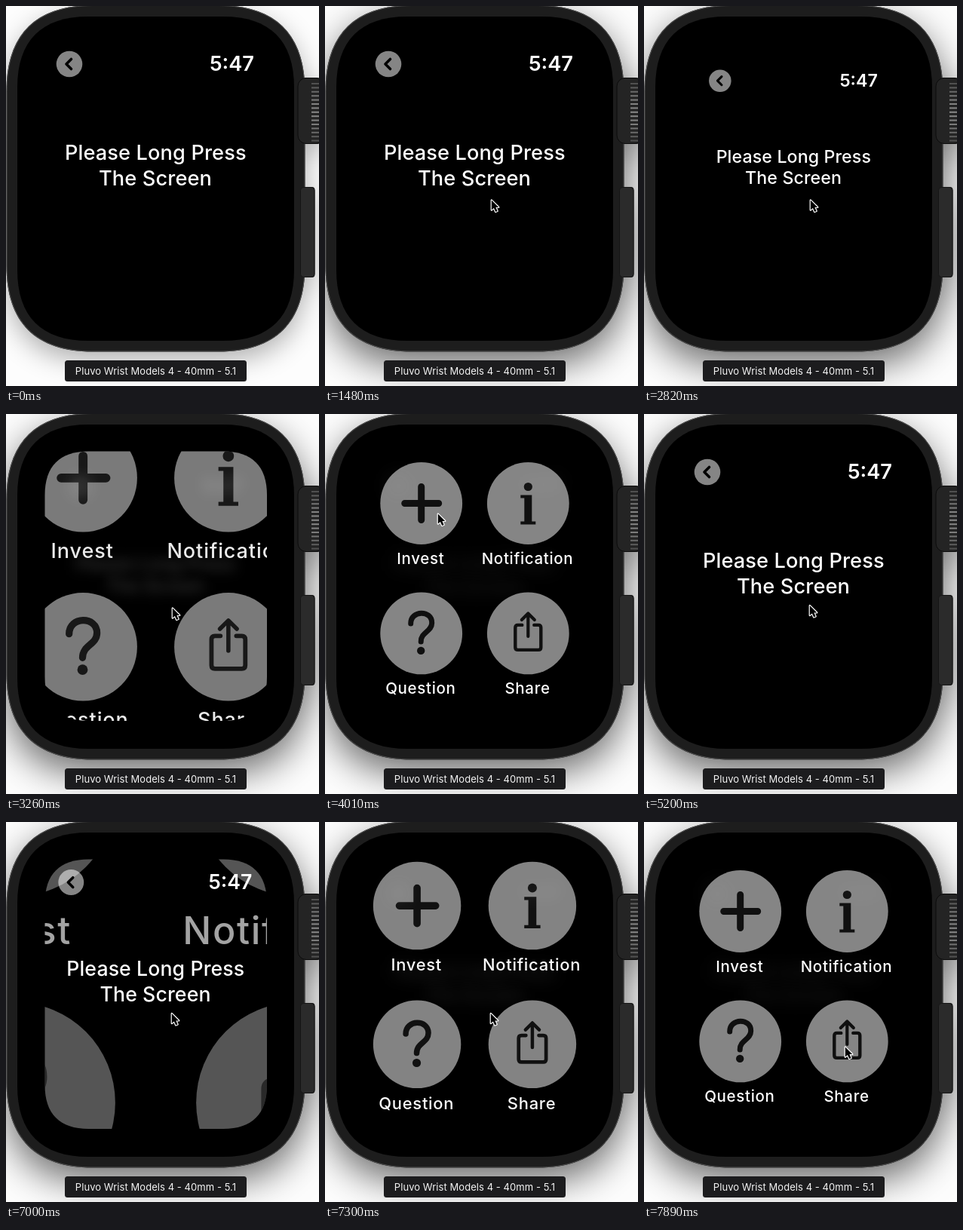
These frames come from a looping animation (415x504 px, 8 s). An HTML page with a canvas:

```html
<!DOCTYPE html>
<html lang="en">
<head>
<meta charset="utf-8">
<title>Long press menu</title>
<style>
html, body { margin: 0; width: 100%; height: 100%; overflow: hidden; background: #fdfdfd; }
canvas { display: block; width: 415px; height: 504px; }
</style>
</head>
<body>
<canvas id="stage"></canvas>
<script>
const W = 415, H = 504, LOOP = 8000;
const FONT = 'Inter, "Open Sans", sans-serif';
const canvas = document.getElementById('stage');
const ctx = canvas.getContext('2d');
const dpr = window.devicePixelRatio || 1;
canvas.width = Math.round(W * dpr);
canvas.height = Math.round(H * dpr);

const clamp = (v, a = 0, b = 1) => Math.min(b, Math.max(a, v));
const mix = (a, b, p) => a + (b - a) * p;
const ease = p => { p = clamp(p); return p * p * (3 - 2 * p); };
// Each burst of motion runs in seven held steps, 0 to 6.
const stepAt = (t, from, to) => clamp(Math.floor((t - from) * 6 / (to - from) + 1e-3), 0, 6);

function fillRound(x, y, w, h, r, fill, edge) {
  ctx.beginPath();
  ctx.roundRect(x, y, w, h, r);
  ctx.fillStyle = fill;
  ctx.fill();
  if (edge) {
    ctx.strokeStyle = edge;
    ctx.lineWidth = 1;
    ctx.stroke();
  }
}

function disc(x, y, r, fill) {
  ctx.beginPath();
  ctx.arc(x, y, r, 0, Math.PI * 2);
  ctx.fillStyle = fill;
  ctx.fill();
}

function text(str, x, y, size, weight, align = 'center', spacing = 0, fill = '#fff') {
  ctx.font = `${weight} ${size}px ${FONT}`;
  ctx.letterSpacing = spacing + 'px';
  ctx.textAlign = align;
  ctx.fillStyle = fill;
  ctx.fillText(str, x, y);
}

function line(d, width, color) {
  ctx.strokeStyle = color;
  ctx.lineWidth = width;
  ctx.lineCap = ctx.lineJoin = 'round';
  ctx.stroke(new Path2D(d));
}

// Rounded box whose corners ease in like a squircle.
function squircle(l, t, r, b, c) {
  const k = c * 0.34;
  ctx.beginPath();
  ctx.moveTo(l + c, t);
  ctx.lineTo(r - c, t);
  ctx.bezierCurveTo(r - k, t, r, t + k, r, t + c);
  ctx.lineTo(r, b - c);
  ctx.bezierCurveTo(r, b - k, r - k, b, r - c, b);
  ctx.lineTo(l + c, b);
  ctx.bezierCurveTo(l + k, b, l, b - k, l, b - c);
  ctx.lineTo(l, t + c);
  ctx.bezierCurveTo(l, t + k, l + k, t, l + c, t);
  ctx.closePath();
}

function drawDevice(focus) {
  ctx.fillStyle = '#fdfdfd';
  ctx.fillRect(0, 0, W, H);

  // Case, crown and button cast one shadow together.
  ctx.save();
  ctx.shadowColor = `rgba(0,0,0,${mix(0.3, 0.58, focus)})`;
  ctx.shadowBlur = mix(34, 50, focus) * dpr;
  ctx.shadowOffsetY = mix(12, 18, focus) * dpr;
  squircle(0.5, -1, 396.5, 458.5, 114);
  ctx.roundRect(386.5, 95, 36, 88, 11);
  ctx.roundRect(390, 240, 19.5, 120, 4);
  ctx.fillStyle = '#1d1d1d';
  ctx.fill();
  ctx.restore();
  squircle(1, -0.5, 396, 458, 114);
  ctx.strokeStyle = '#505050';
  ctx.lineWidth = 1;
  ctx.stroke();
  squircle(15, 14, 382, 444, 94);
  ctx.fillStyle = '#000';
  ctx.fill();

  fillRound(387, 95.5, 35, 87, 11, '#242424', '#0b0b0b');
  for (let y = 102; y < 178; y += 5.4) {
    const glow = Math.round(mix(70, 135, Math.sin((y - 98) / 84 * Math.PI)));
    ctx.fillStyle = `rgb(${glow},${glow},${glow})`;
    ctx.fillRect(405, y, 10, 2);
  }
  fillRound(390.5, 240.5, 18.5, 119, 4, '#2b2b2b', '#151515');

  fillRound(78, 470, 241, 28, 3.5, '#1c1c1e');
  text('Pluvo Wrist Models 4 - 40mm - 5.1', 198.5, 489, 13, 400, 'center', 0.06, '#f4f4f4');
}

function drawHome({ scale, alpha, blur }) {
  if (alpha <= 0) return;
  ctx.save();
  ctx.globalAlpha = alpha;
  if (blur) ctx.filter = `blur(${blur * dpr}px)`;
  ctx.translate(198.5, 228);
  ctx.scale(scale, scale);
  ctx.translate(-198.5, -228);
  disc(84, 77, 17.3, 'rgba(255,255,255,.52)');
  line('M86.5 70.5L80 77L86.5 83.5', 3.6, '#000');
  text('5:47', 329, 86, 27.2, 560, 'right');
  text('Please Long Press', 198.3, 204, 27.2, 450, 'center', 0.12);
  text('The Screen', 198, 237.7, 27.2, 450, 'center', 0.12);
  ctx.restore();
}

const INK = '#101010';
const items = [
  { label: 'Invest', col: -1, row: -1, icon() {
    line('M-22 0H23M0 -22V22', 9, INK);
  } },
  { label: 'Notification', col: 1, row: -1, icon() {
    disc(0, -22, 5.6, INK);
    ctx.fill(new Path2D('M-10 -11H5V24H10V28H-10V24H-5V-7H-10Z'));
  } },
  { label: 'Question', col: -1, row: 1, icon() {
    line('M-14 -13C-14 -31 14 -31 14 -14C14 -2 -.5 -2 -.5 11', 7, INK);
    disc(-0.5, 23, 5.2, INK);
  } },
  { label: 'Share', col: 1, row: 1, icon() {
    line('M-8 -11H-13.5Q-17 -11 -17 -7.5V18.5Q-17 22 -13.5 22H13.5Q17 22 17 18.5V-7.5Q17 -11 13.5 -11H8', 4.4, INK);
    line('M0 4V-26M-8.5 -18L0 -26.5L8.5 -18', 4.2, INK);
  } }
];

// zoom 0 is the settled menu, 1 the large pose it enters from.
function drawMenu({ zoom, alpha }) {
  if (alpha <= 0) return;
  const scale = 1 + 1.45 * zoom;
  for (const it of items) {
    ctx.save();
    ctx.globalAlpha = alpha;
    ctx.translate(198.5 + it.col * 70.8 * (1 + 1.64 * zoom),
                  229.4 + it.row * 86.2 * (1 + 1.36 * zoom));
    ctx.scale(scale, scale);
    ctx.translate(0, -24.7);
    disc(0, 0, 54.4, 'rgba(255,255,255,.52)');
    it.icon();
    text(it.label, -0.8, 80.3, 20.5, 500, 'center', 0.68);
    ctx.restore();
  }
}

function drawCursor(x, y) {
  ctx.save();
  ctx.translate(x, y);
  const arrow = new Path2D('M.8 1.5V14.6L3.9 11.9L6.2 17L8.6 16L6.4 10.9H10.2Z');
  ctx.lineJoin = 'round';
  ctx.lineWidth = 2.4;
  ctx.strokeStyle = '#fff';
  ctx.stroke(arrow);
  ctx.fillStyle = '#000';
  ctx.fill(arrow);
  ctx.restore();
}

const REST = { scale: 1, alpha: 1, blur: 0 };
const HIDDEN = { zoom: 0, alpha: 0 };

function opening(k, startScale) {
  const p = 1 - Math.pow(0.22, k);
  return {
    home: k ? { scale: mix(startScale, 0.88, p), alpha: mix(0.7, 0.13, p), blur: 11 * p }
            : { scale: startScale, alpha: 1, blur: 0 },
    menu: { zoom: k > 2 ? 0 : 1 - p, alpha: k > 2 ? 1 : mix(0.64, 1, p) }
  };
}

function closing(k) {
  const p = ease(k / 4);
  return {
    home: { scale: mix(0.88, 1, p), alpha: mix(0.13, 1, p), blur: 10 * Math.pow(1 - p, 2) },
    menu: k < 2 ? { zoom: 0.04 + 0.075 * k, alpha: 0.82 - 0.46 * k } : HIDDEN
  };
}

const spots = { edge: [262, 508], mid: [220, 256], invest: [149, 131], back: [219, 252.5], share: [266, 297] };
const travel = (a, b, p) => [0, 1].map(i => mix(spots[a][i], spots[b][i], ease(p)));

function stateAt(t) {
  let home = REST, menu = HIDDEN, cursor = null, focus = 1;
  if (t < 600) {
    focus = 0;
  } else if (t < 2820) {
    const k = stepAt(t, 600, 1480);
    focus = clamp((k + 1) / 3);
    cursor = travel('edge', 'mid', k / 6);
  } else if (t < 3110) {
    home = { scale: 0.853, alpha: 1, blur: 0 };
    cursor = spots.mid;
  } else if (t < 4310) {
    const k = stepAt(t, 3110, 4010);
    ({ home, menu } = opening(k, 0.853));
    cursor = travel('mid', 'invest', (k - 2) / 4);
  } else if (t < 7000) {
    const k = stepAt(t, 4310, 5200);
    ({ home, menu } = closing(k));
    cursor = travel('invest', 'back', (k - 1) / 5);
  } else {
    const k = stepAt(t, 7000, 7890);
    ({ home, menu } = opening(k, 0.98));
    cursor = travel('back', 'share', (k - 2) / 4);
  }
  return { home, menu, cursor, focus };
}

function draw(t) {
  const s = stateAt(t);
  ctx.setTransform(dpr, 0, 0, dpr, 0, 0);
  drawDevice(s.focus);
  ctx.save();
  squircle(51.5, 49.5, 346, 407, 58);
  ctx.clip();
  drawMenu(s.menu);
  drawHome(s.home);
  ctx.restore();
  if (s.cursor) drawCursor(...s.cursor);
}

const start = performance.now();
function tick() {
  draw((performance.now() - start) % LOOP);
  requestAnimationFrame(tick);
}
tick();
</script>
</body>
</html>
```
